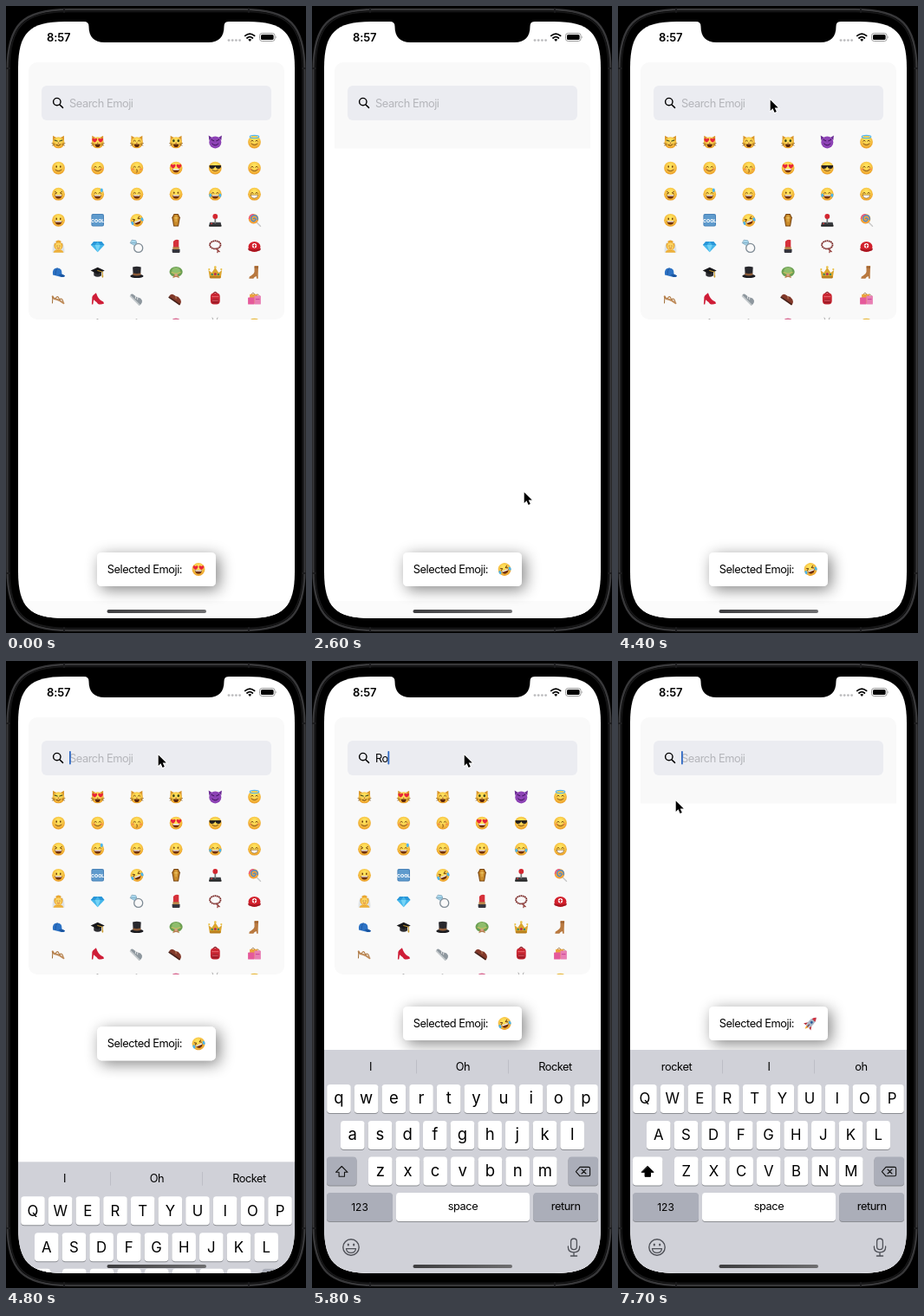
An HTML page for the animation above (8000 ms loop, 346x724 px).

```html
<!DOCTYPE html>
<html lang="en">
<head>
<meta charset="utf-8">
<title>Emoji picker</title>
<style>
html, body { margin: 0; width: 100%; height: 100%; overflow: hidden; background: #000; }
svg { display: block; width: 346px; height: 724px; }
text { font: 12.8px Inter, "Liberation Sans", sans-serif; letter-spacing: -.035em; white-space: pre; }
.mid { text-anchor: middle; }
.key { letter-spacing: 0; text-anchor: middle; }
</style>
</head>
<body>
<script>
const LOOP = 8000;
const fill = (d, c) => `<path d="${d}" fill="${c}"/>`;
const line = (d, c = '#6b3a0c', w = 1) =>
  `<path d="${d}" fill="none" stroke="${c}" stroke-width="${w}" stroke-linecap="round" stroke-linejoin="round"/>`;
const dot = (x, y, rx, c, ry = rx) => `<ellipse cx="${x}" cy="${y}" rx="${rx}" ry="${ry}" fill="${c}"/>`;
const box = (x, y, w, h, c, r = 0, extra = '') =>
  `<rect x="${x}" y="${y}" width="${w}" height="${h}" rx="${r}" fill="${c}" ${extra}/>`;
const text = (x, y, s, attrs = '') => `<text x="${x}" y="${y}" ${attrs}>${s}</text>`;
const at = (x, y, s) => `<g transform="translate(${x} ${y})">${s}</g>`;
const turn = (a, s) => `<g transform="rotate(${a})">${s}</g>`;
// Rectangle with continuous corners that ease into the sides
const smoothBox = (x, y, w, h, r) => {
  const e = r * 1.25, k = r * .63 * 1.25, b = e - k, c = e - b;
  return `M${x + e} ${y}h${w - 2 * e}c${c * 1.2} 0 ${e} ${e - c * 1.2} ${e} ${e}v${h - 2 * e}` +
    `c0 ${c * 1.2} ${c * 1.2 - e} ${e} ${-e} ${e}h${2 * e - w}c${-c * 1.2} 0 ${-e} ${c * 1.2 - e} ${-e} ${-e}` +
    `v${2 * e - h}c0 ${-c * 1.2} ${e - c * 1.2} ${-e} ${e} ${-e}z`;
};

// Facial features, drawn around 0,0 in a 16 px box
const brown = '#6b3a0c';
const eyes = dot(-2.3, -1.6, .8, brown, 1.2) + dot(2.3, -1.6, .8, brown, 1.2);
const arcs = line('M-3.8-1q1.3-2 2.6 0M1.2-1q1.3-2 2.6 0', brown, .9);
const squint = line('M-4-2.8l2.2 1.3l-2.2 1.3M4-2.8l-2.2 1.3l2.2 1.3', brown, .9);
const heart = 'M0 2.6C-5-.6-2.4-4 0-1.5C2.4-4 5-.6 0 2.6z';
const hearts = at(-3.4, -2, fill(heart, '#e8253a')) + at(3.4, -2, fill(heart, '#e8253a'));
const grin = fill('M-4.2 1h8.4q-.6 4.2-4.2 4.2T-4.2 1z', '#70300c') + fill('M-3.8 1h7.6l-.5 1.3h-6.6z', '#fff');
const teeth = fill('M-4.2 1h8.4q-.6 3.8-4.2 3.8T-4.2 1z', '#fff') + line('M-4.2 1h8.4q-.6 3.8-4.2 3.8T-4.2 1z', brown, .5);
const smile = line('M-3.4 2q3.4 3 6.8 0', brown, .9);
const blush = dot(-4.6, 1.4, 1.5, '#f58a4b', 1) + dot(4.6, 1.4, 1.5, '#f58a4b', 1);
const tear = x => dot(x, 1.4, 1.4, '#48b4ef', 2.2);
const face = s => dot(0, 0, 7.4, 'url(#gold)') + s;
const cat = s => fill('M-6.6 0L-6.4-7.2L-2-4.8zM6.6 0L6.4-7.2L2-4.8z', '#d8952a') +
  dot(0, .8, 7, 'url(#gold)', 6.5) + dot(0, 1.2, .9, '#a8483a', .6) +
  line('M-7.5 1.5l3 .6M-7 4l2.6-.8M7.5 1.5l-3 .6M7 4l-2.6-.8', '#6d4510', .6) + s;
const catMouth = fill('M-3.2 2.4h6.4q-.4 3.6-3.2 3.6t-3.2-3.6z', '#5c280c');
const catEyes = dot(-2.7, -1.4, 1.3, '#3f4a1c', 1.6) + dot(2.7, -1.4, 1.3, '#3f4a1c', 1.6);

const cool = box(-7.3, -7.3, 14.6, 14.6, '#4a83b8', 2) + box(-6.3, -6.3, 12.6, 12.6, '#5f9bcd', 1.5) +
  '<text class="key" y="2.2" fill="#fff" style="font-size:5.4px;font-weight:800">COOL</text>';
const coffin = fill('M-2.5-7.3h5l2.2 4.3l-1.8 10.3h-5.8l-1.8-10.3z', '#75420f') +
  fill('M-1.9-6.3h3.8l1.6 3.4l-1.4 9.2h-4.2l-1.4-9.2z', '#c98a2a') + line('M0-4.5v6M-1.6-2.5h3.2', '#f3cf69', .9);
const joystick = fill('M-6.3 2.5h12.6l1 4.6h-14.6z', '#3c3e42') + box(-7, 5.4, 14, 1.9, '#222', .8) +
  line('M0 3V-3', '#777', 1.7) + dot(0, -4.4, 2.9, '#d4262f') + dot(-4.2, 4, 1.2, '#e23b3b', .7);
const lollipop = line('M1 1L7 7', '#c9c9c9', 1.4) + dot(-1, -1.6, 5.8, '#f2a23a') +
  line('M-1-1.8q2-1.5 2.5 1q-1.5 3.5-4.6 1q-2-4.6 2.1-5.8q5.5 0 4.6 5', '#4389d3', 1.3) +
  line('M-6-1.8q.6-4.3 4.6-4.8', '#e6518d', 1.3);
const bride = fill('M-7 7q0-14 7-14t7 14z', '#dfe3e6') + dot(0, -1, 5, '#e9a62f', 5.8) +
  dot(0, 0, 3.6, '#fcd463', 4.2) + dot(-1.5, -.4, .5, brown) + dot(1.5, -.4, .5, brown) +
  line('M-1.4 2q1.4 1.2 2.8 0', '#bf4c30', .7) + fill('M-6 7.3q1-3.4 6-3.4t6 3.4z', '#eeb03a') +
  dot(-3.6, -4.3, 1, '#f2f2f2') + dot(3.6, -4.3, 1, '#f2f2f2');
const gem = fill('M-4.5-5.4h9l3.3 4L0 6.8l-7.8-8.2z', '#45b6ea') + fill('M-3-1.4h6L0 6.8z', '#76d4f6') +
  fill('M-4.5-5.4L-7.8-1.4h4.8l3-4zM7.8-1.4h-4.8l-3-4h4.5z', '#2a96d8');
const ring = '<circle cx="1.8" cy="2" r="5" fill="none" stroke="#7f8b95" stroke-width="1.3"/>' +
  fill('M-5.4-7.2l4.2.6l1.2 2.8l-3 2.8l-4.4-2.6z', '#a8d7ed') + line('M-7-4l6.6.2M-5.4-7.2l4.2.6l1.2 2.8l-3 2.8l-4.4-2.6z', '#6b94ac', .6);
const lipstick = box(-4.4, 3, 8.8, 4.5, '#34343c', .8) + box(-3.6, .6, 7.2, 3, '#b8874a') +
  fill('M-3.2.8V-5.4q2.6-3.2 6.4-1.8V.8z', '#d5303a');
const beads = '<ellipse cy="-1.6" rx="6.2" ry="4.6" fill="none" stroke="#7b2a28" stroke-width="1.8" stroke-dasharray="1.7 .5"/>' +
  line('M1 3l2 1.6l-.4 2.6M3 4.6l2 1.7', '#8c2f2b', 1.2);
const helmet = dot(0, .6, 7, '#d21f2b', 6) + fill('M-7.6 2.4q7.6 3.6 15.2 0l-1 2.4q-6.6 2.6-13.2 0z', '#a5151f') +
  dot(0, -.6, 2.7, '#fff') + line('M0-2.2v3.2M-1.6-.6h3.2', '#d21f2b', 1.1);
const cap = fill('M-6.5 3q-1-8 5-8q6 0 5.5 7l3.4 2q-.6 2.2-5 1.2z', '#2c72c4') + line('M-1.5-4.8q-2.4 3-2 7.4', '#1c4f96', .7) +
  fill('M0 3q4-2 7.6 1q-.8 2-4.4 1.3z', '#1b559f');
const gradCap = fill('M-4.4-.6h8.8v4.4q-4.4 3-8.8 0z', '#2d2d31') + fill('M0-5.8l8 3.8l-8 4l-8-4z', '#17171a') +
  line('M0-2l5.7 1.6v4.2', '#c99a2d', 1) + dot(5.7, 4.6, .9, '#c99a2d', 1.6);
const topHat = dot(0, 4.4, 7.6, '#1c1c20', 2.2) + fill('M-4.8-6q4.8-1.4 9.6 0l-.6 10q-4.2 1.4-8.4 0z', '#28282d') +
  fill('M-4.4.8q4.4 1.6 8.8 0v2.4q-4.4 1.4-8.8 0z', '#8b5a36');
const sunHat = dot(0, -.6, 7.6, '#6b9f52', 6) + dot(0, -1.6, 4.8, '#8fbd6c', 4) +
  line('M-5 0q5 3.2 10 0', '#c9bd62', 1.2) + fill('M-4 6.8l2-4.4h4l2 4.4l-4-1.6z', '#b98252') + dot(0, 3, 1.5, '#d9a08a');
const crown = fill('M-6.4 6.4l-1.4-9l3.8 3l4-6l4 6l3.8-3l-1.4 9z', '#dba52e') + box(-6.2, 4.2, 12.4, 2.8, '#b87f1e', .8) +
  dot(0, -5.8, 1.4, '#e9c148') + dot(-7, -3.4, 1.1, '#e9c148') + dot(7, -3.4, 1.1, '#e9c148') +
  dot(0, 2, 1.5, '#b52f58') + dot(-3.6, 2.4, 1.2, '#3a8c66') + dot(3.6, 2.4, 1.2, '#3a8c66');
const boot = fill('M0-7.4h4.6l-.4 9.6v5h-1.6l-.4-2.6q-2.2.6-3.4 2.6h-5q-.2-2.4 2.6-3.4q3-1.4 3.6-4.2z', '#b9793f') +
  line('M.4-5.6h3.8', '#80502a', .8);
const sandal = line('M-6.8-2.2q1 3 4 3.2q4 .8 8.8 4.6', '#c08d5c', 2) + line('M-6.6-1.6l-.4 7', '#a06c35', 1) +
  line('M-3.6.4q2.8-5.2 4.6 1M1 1.6q3-3 4.6 2.6', '#b27d48', 1.1);
const heel = fill('M7.4 6q-.2-2.6-3.2-3.4q-3.4-1.6-6-9l-3.6 3q-1.4 1.6-1 4.2l-.4 6h1.4l.8-5.2q3.4 2.4 5 4.8q3 1.2 7-.4z', '#cf1d37');
const sneaker = turn(45, fill('M-8 2.6q-.4-3 2.6-3q5 0 8.4-2.6q2.8-.2 4.4 2q1 1.8.4 5z', '#8e979e') +
  fill('M-8 2.4h15.8v1.8h-15q-1-.4-.8-1.8z', '#c4c9cc') + line('M-2.4-.6l1.4 1.8M0-1.4l1.4 1.8', '#eee', .8));
const shoe = turn(35, fill('M-8 2.8q-.4-4.4 3-4.6q4 .4 6-1.2q4 .4 6.2 3q1 2 .6 4.2z', '#82392a') +
  fill('M-8 2.6h15.8v1.7h-15.6z', '#44211a') + line('M-1.4-1.6l1.6 1.8', '#c28a61', .8));
const backpack = line('M-2-5.8q2-2.8 4 0', '#7d151f', 1.2) + box(-5.4, -6, 10.8, 13, '#c92632', 4) +
  box(-4, .8, 8, 5.2, '#a11b27', 1.5) + line('M-3.6-2h7.2M-3 2.6h6', '#ee737a', .8);
const bags = line('M-3.4-4q1-5 4.4 0M2-2.6q1-4.6 4 0', '#8c6a3c', .8) + box(-5.4, -4.8, 9, 11, '#eaa33c', .7) +
  box(-7.4, -1, 7.4, 8, '#e55a9b', .7) + box(0, -3, 7.4, 10, '#e87fb4', .7) + line('M1.8 1h3.8', '#c9459a', 1);
const rocket = turn(45, fill('M-2.8 1l-3 4.4l3.2-.4zM2.8 1l3 4.4l-3.2-.4z', '#b92c38') +
  fill('M-1.8 4.6h3.6l-1.8 4.4z', '#f5a32c') + fill('M0-9.4q4 4.4 3 11l-1 3.4h-4l-1-3.4q-1-6.6 3-11z', '#a9b7c6') +
  fill('M0-9.4q2 2 2.6 4.4h-5.2q.6-2.4 2.6-4.4z', '#cf3341') + dot(0, -1.8, 1.5, '#2c5d98') + line('M0 2v3', '#7b2534', 1));

const loveFace = face(hearts + grin);
const laughing = turn(-22, face(squint + grin + tear(-6) + tear(6)));
const emojis = [
  cat(line('M-4.4-2l3 1M4.4-2l-3 1', '#3f4a1c', 1.3) + line('M-2.5 3.4q3 2 5-.6')),
  cat(hearts + catMouth), cat(arcs + catMouth), cat(catEyes + catMouth),
  fill('M-7-2l-.6-5.6l4 2.6zM7-2l.6-5.6l-4 2.6z', '#6b2b93') + dot(0, .4, 7, '#8d43b5') +
    line('M-4.4-2.6l3 1.4M4.4-2.6l-3 1.4M-3.6 2q3.6 3.8 7.2 0', '#3c1458'),
  face(arcs + smile) + '<ellipse cy="-6" rx="5.2" ry="1.6" fill="none" stroke="#58b9ef" stroke-width="1.3"/>',
  face(eyes + smile), face(blush + arcs + smile),
  face(blush + arcs + line('M-.4 1.6q2 .4.3 1.6q2 .6-.2 1.8', brown, .8)), loveFace,
  face(fill('M-6.8-3.2h13.6q.2 4-3.4 4q-2.6 0-3.4-2.6q-.8 2.6-3.4 2.6q-3.6 0-3.4-4z', '#25211f') + smile),
  face(blush + arcs + smile),
  face(squint + grin), face(arcs + grin + dot(4.6, -4.4, 1.5, '#4bb6ee', 2.2)), face(arcs + grin), face(eyes + grin),
  face(arcs + grin + tear(-5.6) + tear(5.6)), face(arcs + teeth),
  face(eyes + grin), cool, laughing, coffin, joystick, lollipop,
  bride, gem, ring, lipstick, beads, helmet,
  cap, gradCap, topHat, sunHat, crown, boot,
  sandal, heel, sneaker, shoe, backpack, bags
];
const grid = emojis.map((e, i) => at(60.5 + i % 6 * 45.2, 157 + Math.floor(i / 6) * 30.1, e)).join('') +
  line('M103 364q2.5-5 5 0', '#8b8b8b', 1) + dot(150.5, 362, 1, '#bbb') + dot(196, 363, 4.5, '#d8668f', 2.5) +
  line('M238 360l1.5 4M244 360l-1.5 4', '#999', .8) + dot(286.5, 363.5, 5, '#e8b93e', 2.8);

const key = (x, y, w, c) => box(x, y + 1, w, 33, '#8b8d92', 3.8) + box(x, y, w, 33, c, 3.8);
const letters = [['QWERTYUIOP', 31, 489], ['ASDFGHJKL', 46.8, 531], ['ZXCVBNM', 78.8, 572.5]].map(([row, x0, y]) =>
  [...row].map((ch, i) => {
    const x = x0 + i * 31.67;
    return key(x - 13.8, y, 27.6, '#fff') + text(x, y + 22.4, ch, 'class="key letter"');
  }).join('')).join('');
const arrow = 'M34.3 583.5l6.8 6.8h-3.6v5h-6.4v-5h-3.6z';
const keyboard = box(14, 449, 319, 520, '#d0d1d8') +
  line('M120.5 461v15M226.5 461v15', '#bbbcc4', .9) +
  [67.5, 174, 280.5].map(x => text(x, 473, '', 'class="mid hint"')).join('') + letters +
  `<g id="shiftOn">${key(17, 572.5, 34.5, '#fff') + fill(arrow, '#000') + line(arrow, '#000')}</g>` +
  `<g id="shiftOff">${key(17, 572.5, 34.5, '#abaeb9') + line(arrow, '#111', 1.1)}</g>` +
  key(295.5, 572.5, 34.5, '#abaeb9') +
  line('M304.4 589.6l4.6-5.2h10q1.6 0 1.6 1.6v7.2q0 1.6-1.6 1.6h-10zM311 587l5 5M316 587l-5 5', '#111', 1.1) +
  key(17, 614, 76, '#abaeb9') + key(97, 614, 154, '#fff') + key(255.3, 614, 74.7, '#abaeb9') +
  text(55, 635, '123', 'class="mid" style="font-size:12px;letter-spacing:0"') +
  text(174, 634, 'space', 'class="mid"') + text(292.7, 634, 'return', 'class="mid"') +
  '<circle cx="45" cy="677" r="9.2" fill="none" stroke="#4e5057" stroke-width="1.4"/>' +
  dot(41.8, 674, 1.1, '#4e5057', 1.6) + dot(48.2, 674, 1.1, '#4e5057', 1.6) +
  line('M39.4 678.6h11.2q-.8 4.8-5.6 4.8t-5.6-4.8z', '#4e5057', 1.2) +
  box(298.6, 667, 6.8, 12.6, 'none', 3.4, 'stroke="#4e5057" stroke-width="1.3"') +
  line('M295.4 676v1q0 5.8 6.6 5.8t6.6-5.8v-1M302 683v4M298.4 687h7.2', '#4e5057', 1.3);

const status = text(47, 41, '8:57', 'style="font-size:13px;font-weight:600;letter-spacing:-.01em"') +
  [257, 261.2, 265.4, 269.6].map(x => dot(x, 39.6, 1.4, '#bcbcbe')).join('') +
  line('M275.8 34.4q5.4-4.6 10.8 0M278 37q3.2-2.8 6.4 0', '#000', 1.8) + fill('M279.2 38.8q2-1.8 4 0l-2 2.2z', '#000') +
  box(292.5, 31.5, 17.6, 9, 'none', 2.8, 'stroke="#999" stroke-width="1"') + box(294, 33, 14.6, 6, '#000', 1.6) +
  fill('M311.2 34.4q1.6 1.6 0 3.2z', '#999');

document.body.innerHTML = `<svg viewBox="0 0 346 724" xmlns="http://www.w3.org/2000/svg">
<defs>
  <radialGradient id="gold" cy=".35" r=".68"><stop offset=".2" stop-color="#ffe25c"/><stop offset="1" stop-color="#ea9a26"/></radialGradient>
  <linearGradient id="bar"><stop stop-color="#3d3d3f"/><stop offset="1" stop-color="#6e6e70"/></linearGradient>
  <clipPath id="screen"><path d="${smoothBox(14, 18, 319, 689, 43)}"/></clipPath>
  <clipPath id="panelClip"><rect id="panelRect" x="26" y="65" width="295" height="297"/></clipPath>
  <filter id="shadow" x="-40%" y="-120%" width="180%" height="340%"><feDropShadow dx="4" dy="4" stdDeviation="8.5" flood-opacity=".48"/></filter>
</defs>
${box(0, 0, 346, 724, '#000')}
${line(smoothBox(1.5, 4, 343, 717, 57), '#38383a', 2.4)}
${line(smoothBox(4, 6.5, 338, 712, 54), '#171718', 1.5)}
${line('M0 72h4M342 72h4M0 655h4M342 655h4M67 3v4M280 3v4M67 718v4M280 718v4', '#1c1c1e', 2)}
<g clip-path="url(#screen)">
  ${box(14, 18, 319, 689, '#fff')}${box(14, 687, 319, 20, '#fbfbfb')}
  <g clip-path="url(#panelClip)">
    ${box(26, 65, 295, 297, '#f9f9f9', 10)}
    <g id="grid">${grid}</g><g id="result">${at(60.5, 157, rocket)}</g>
  </g>
  ${box(41, 92, 265, 40, '#ebecf1', 6)}
  <circle cx="58.8" cy="110.6" r="4.2" fill="none" stroke="#000" stroke-width="1.4"/>${line('M62 114l3.5 3.4', '#000', 1.5)}
  ${text(73, 116.8, '', 'id="query"')}
  ${box(73, 104, 1.8, 15.5, '#2f69c4', .8, 'id="caret"')}
  ${status}
  ${fill('M90 18q5.5 0 5.5 5.5c0 12 6 18.5 18 18.5h120c12 0 18-6.5 18-18.5q0-5.5 5.5-5.5z', '#000')}
  <g id="pill">
    ${box(105, 631, 137, 39, '#fff', 5.5, 'filter="url(#shadow)"')}
    ${text(116.8, 655, 'Selected Emoji:')}<g id="picked" transform="translate(222 650.5)"></g>
  </g>
  <g id="keyboard">${keyboard}</g>
  ${box(116.5, 697, 114.5, 4, 'url(#bar)', 2)}
</g>
<g id="cursor"><path d="M.7 1.4v12.6l2.8-2.7l2.1 4.8l2.2-1l-2.1-4.6h4.1z" stroke="#fff" stroke-width="1.8" paint-order="stroke"/></g>
</svg>`;

const el = id => document.getElementById(id);
const all = cls => [...document.querySelectorAll('.' + cls)];
const keyLabels = all('letter'), hintLabels = all('hint');
const clamp = v => Math.min(1, Math.max(0, v));
const ease = (t, from, to) => { const p = clamp((t - from) / (to - from)); return p * p * (3 - 2 * p); };
const show = (id, on) => el(id).setAttribute('opacity', +on);
const shift = (id, x, y) => el(id).setAttribute('transform', `translate(${x} ${y})`);
// Share of the distance still to travel for a critically damped spring
const spring = (t, start) => { const s = Math.max(0, t - start) * .0184; return (1 + s) * Math.exp(-s); };

const PICK_FACE = 1900, OPEN = 3200, FOCUS = 4500, FILTER = 6050, PICK_ROCKET = 7300;
const typing = [5500, 5700, 5900, 6050, 6200, 6400];
const path = [[300, 308, 420], [1000, 163, 237], [2050, 163, 237], [2600, 244, 560], [2700, 244, 560],
  [3000, 224, 658], [3700, 224, 654], [4300, 175, 107], [6650, 175, 107], [7200, 66, 160], [LOOP, 66, 160]];

function cursorAt(t) {
  const i = Math.max(1, path.findIndex(p => p[0] > t));
  const [t0, x0, y0] = path[i - 1], [t1, x1, y1] = path[i], p = ease(t, t0, t1);
  return [x0 + (x1 - x0) * p, y0 + (y1 - y0) * p];
}

let pickedNow;
function render(t) {
  const open = 1 - ease(t, PICK_FACE, PICK_FACE + 300) + ease(t, OPEN, OPEN + 300) - ease(t, PICK_ROCKET, PICK_ROCKET + 300);
  const filtered = t >= FILTER;
  el('panelRect').setAttribute('height', 99.5 + 197.5 * open);
  el('grid').setAttribute('opacity', filtered ? 0 : open);
  el('result').setAttribute('opacity', filtered ? open : 0);

  const picked = t < PICK_FACE ? loveFace : t < PICK_ROCKET ? laughing : rocket;
  if (picked !== pickedNow) el('picked').innerHTML = pickedNow = picked;

  const typed = t < PICK_ROCKET ? 'Rocket'.slice(0, typing.filter(k => k <= t).length) : '';
  const query = el('query');
  query.textContent = typed || 'Search Emoji';
  query.setAttribute('fill', typed ? '#000' : '#b4b5ba');
  el('caret').setAttribute('x', typed ? 72.6 + query.getComputedTextLength() : 73);
  show('caret', t >= FOCUS);

  const lower = typed !== '';
  keyLabels.forEach(k => {
    k.textContent = lower ? k.textContent.toLowerCase() : k.textContent.toUpperCase();
    k.style.fontSize = lower ? '18.5px' : '16.8px';
  });
  show('shiftOn', !lower);
  show('shiftOff', lower);
  const hints = t >= PICK_ROCKET ? ['rocket', 'I', 'oh']
    : typed.length > 2 ? [`“${typed}”`, 'Rocket', 'Rockets'] : ['I', 'Oh', 'Rocket'];
  hintLabels.forEach((h, i) => h.textContent = hints[i]);

  shift('keyboard', 0, 258 * spring(t, 4710));
  shift('pill', 0, -232 * (1 - spring(t, 4590)));
  shift('cursor', ...cursorAt(t));
  show('cursor', t >= 300);
}

const start = performance.now();
function tick() {
  render((performance.now() - start) % LOOP);
  requestAnimationFrame(tick);
}
tick();
</script>
</body>
</html>
```
